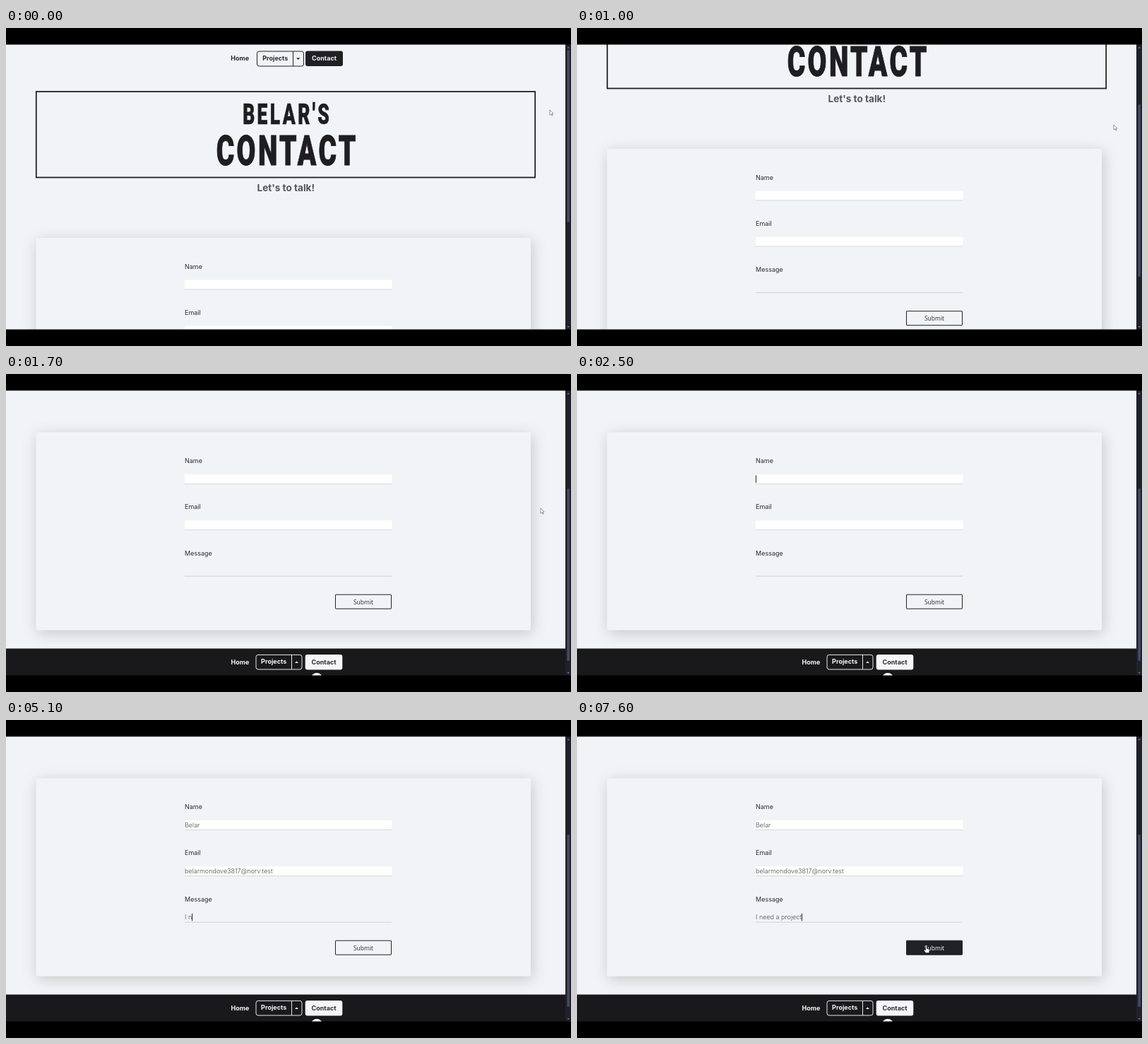
Animation of 800 by 450 pixels, one loop 7700 ms. Source, as an HTML page:

```html
<!DOCTYPE html>
<html lang="en">
<head>
<meta charset="utf-8">
<title>Contact page</title>
<style>
  html, body { margin: 0; width: 100%; height: 100%; overflow: hidden; background: #000; }
  svg { display: block; width: 800px; height: 450px; }
  text { font: 400 9px Inter, sans-serif; fill: #2c2c30; white-space: pre; }
  .bold { font-weight: 700; }
  .mid { text-anchor: middle; }
  /* condensed display face */
  .title { transform: scaleX(.66); font-family: Roboto, sans-serif; font-weight: 900; letter-spacing: 5.2px; fill: #1e1d20; stroke: #1e1d20; }
  .small { font-size: 40px; stroke-width: .6px; }
  .large { font-size: 59px; stroke-width: 1px; }
  .lead { font-size: 13.6px; fill: #56565a; }
  .typed { font-weight: 300; fill: #4c4c50; }
  .send { font: 400 8.5px "Open Sans", "Noto Sans", sans-serif; }
  .light { fill: #f6f5f8; }
  .card { fill: #f2f3f6; filter: drop-shadow(2px 4px 10px rgba(0, 0, 0, .18)); }
  .line { fill: none; stroke: #222225; }
  .hover rect { fill: #202124; stroke: #202124; }
  .hover text { fill: #fff; }
</style>
</head>
<body>
<svg viewBox="0 0 800 450">
  <rect width="800" height="450" fill="#f2f3f6"/>
  <g id="page">
    <text class="bold mid" x="331.2" y="46.3">Home</text>
    <rect class="line" x="355.5" y="33" width="66" height="21" rx="3"/>
    <path class="line" d="M406.5 33v21"/>
    <text class="bold mid" x="381.3" y="46.3">Projects</text>
    <path d="M411.2 42.2h5l-2.5 2.7z" fill="#222225"/>
    <rect x="424" y="32.5" width="53" height="21.5" rx="3" fill="#202023"/>
    <text class="bold mid light" x="450.5" y="46.3">Contact</text>

    <rect class="line" x="42.8" y="90" width="706.4" height="121.5" stroke-width="1.8"/>
    <g transform="translate(396.5 0)">
      <text class="title small mid" x="2.6" y="135.6">BELAR'S</text>
      <text class="title large mid" x="2.6" y="194.5">CONTACT</text>
    </g>
    <text class="bold lead mid" x="396.3" y="231">Let's to talk!</text>

    <rect class="card" x="42.5" y="297" width="700.5" height="280" rx="2"/>
    <g id="fields"></g>
    <path d="M253 500.6h293" stroke="#c9cacd" stroke-width=".8"/>
    <g id="send">
      <rect class="line" x="466.5" y="526.7" width="79" height="20" rx=".5"/>
      <text class="send mid" x="506" y="540">Submit</text>
    </g>
    <path id="caret" d="M.5 0v10.5" stroke="#222"/>

    <rect y="603" width="793" height="60" fill="#19191b"/>
    <text class="bold mid light" x="331.5" y="625.3">Home</text>
    <rect class="line" x="354" y="611.9" width="65" height="20.6" rx="3" style="stroke:#e8e7ea"/>
    <path d="M404.5 612v20.5" stroke="#e8e7ea"/>
    <text class="bold mid light" x="379.2" y="624.8">Projects</text>
    <path d="M409 623.6h5l-2.5-2.7z" fill="#f6f5f8"/>
    <rect x="423.7" y="611.4" width="52.6" height="21.5" rx="3" fill="#f6f5f8"/>
    <text class="bold mid" x="450" y="625.3">Contact</text>
    <circle cx="440" cy="646" r="8.5" fill="#fff"/>
  </g>
  <path id="arrow" d="M0 0v7.2l1.8-1.6 1.2 2.5 1-.5-1.1-2.4 2.2-.2z" fill="#fff" stroke="#55555c" stroke-width=".6"/>
  <path id="hand" d="M-.8.6q.8-1.2 1.6 0v3.6l3 .8q.8.3.7 1.4l-.6 3.6h-4.6l-2.5-3.5q.1-1.2 1.2-.7l1.2 1z" fill="#fff" stroke="#222" stroke-width=".5"/>
  <rect x="792" width="8" height="450" fill="#20202c"/>
  <path d="M794.4 28.6l1.8-2 1.8 2zM794.4 422l1.8 2 1.8-2z" fill="#777784"/>
  <rect id="thumb" x="794.4" width="3.6" height="244" rx="1.6" fill="#484864"/>
  <path d="M0 0h800v23.5H0zM0 426.5h800v23.5H0z"/>
</svg>
<script>
const LOOP = 7700;
const $ = id => document.getElementById(id);

const LABELS = ["Name", "Email", "Message"];
const NAME = "Belar", MAIL = "belarmondove3817@norv.test", NOTE = "I need a project";

// [time, scroll]
const SCROLL = [[0, 0], [100, 5], [200, 19], [400, 55], [600, 107], [700, 125], [1000, 126],
  [1100, 135], [1300, 168], [1500, 205], [1600, 213], [1700, 214.5]];
// [time, x, y]
const MOUSE = [[0, 770, 116], [400, 769, 116], [900, 768, 118], [1000, 760, 137], [1400, 758, 168],
  [1700, 757, 190], [2000, 655, 176], [2300, 462, 158], [2400, 430, 149],
  [6800, 430, 149], [7000, 440, 182], [7300, 480, 286], [7500, 493, 316], [7600, 494.5, 319.5]];
// key press times
const NAME_KEYS = [3000, 3200, 3300, 3400, 3500];
const MAIL_TIME = 4000;
const NOTE_KEYS = [...NOTE].map((_, i) => 4900 + 100 * i + (i > 11 ? 100 : 0));
const KEYS = [...NAME_KEYS, MAIL_TIME, ...NOTE_KEYS];
// [focus time, field]
const FOCUS = [[2500, 0], [3600, 1], [4200, 2]];

$("fields").innerHTML = LABELS.map((label, i) => {
  const y = 340.7 + 65.2 * i;
  const box = i < 2 ? `<rect x="253" y="${y + 15.8}" width="293.5" height="13.2" rx="1" fill="#fff"/>
    <path d="M253 ${y + 29.2}h293.5" stroke="#cfd0d3" stroke-width=".8"/>` : "";
  return `<text x="253" y="${y}">${label}</text>${box}<text class="typed" x="253" y="${y + 25.8}"></text>`;
}).join("");
const typed = [...document.querySelectorAll(".typed")];

function at(keys, t) {
  const i = keys.findIndex(k => k[0] > t);
  if (i < 0) return keys.at(-1).slice(1);
  const a = keys[i - 1], b = keys[i], p = (t - a[0]) / (b[0] - a[0]);
  return a.slice(1).map((v, n) => v + (b[n + 1] - v) * p);
}

const place = (el, x, y) => el.setAttribute("transform", `translate(${x} ${y})`);
const show = (el, on) => el.setAttribute("visibility", on ? "visible" : "hidden");
const pressed = (keys, t) => keys.filter(k => k <= t).length;

function draw(time) {
  const t = Math.floor(time / 100) * 100;
  const [scroll] = at(SCROLL, t);
  place($("page"), 0, -scroll);
  $("thumb").setAttribute("y", 31 + scroll * .611);

  typed[0].textContent = NAME.slice(0, pressed(NAME_KEYS, t));
  typed[1].textContent = t >= MAIL_TIME ? MAIL : "";
  typed[2].textContent = NOTE.slice(0, pressed(NOTE_KEYS, t));

  const focus = FOCUS.filter(f => f[0] <= t).at(-1);
  show($("caret"), false);
  if (focus) {
    const [since, n] = focus;
    const last = Math.max(since, ...KEYS.filter(k => k <= t));
    const width = typed[n].textContent ? typed[n].getComputedTextLength() : 0;
    place($("caret"), 253 + width, 357.9 + 65.2 * n);
    show($("caret"), (t - last) % 1000 < 500);
  }

  const [x, y] = at(MOUSE, t);
  const hover = t >= 7400, inField = t >= 2400 && t < 6900;
  place($("arrow"), x, y);
  place($("hand"), x, y);
  show($("arrow"), !hover && !inField);
  show($("hand"), hover);
  $("send").classList.toggle("hover", hover);
}

const start = performance.now();
function tick() {
  draw((performance.now() - start) % LOOP);
  requestAnimationFrame(tick);
}
tick();
</script>
</body>
</html>
```
